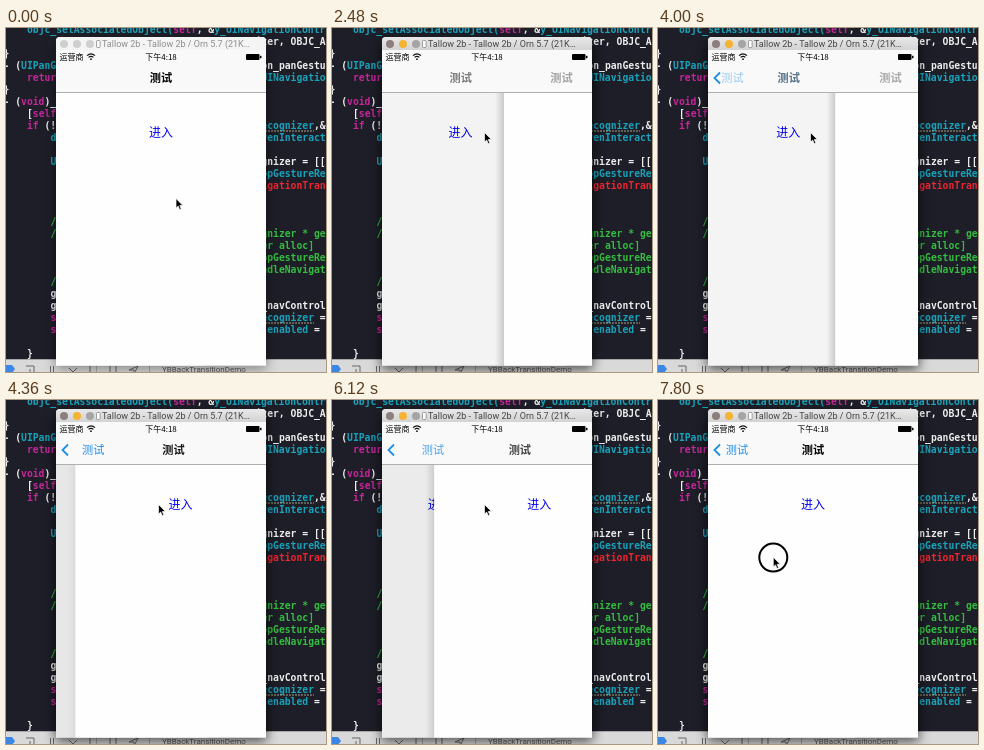
Recreate the animation shown at these times as an HTML page. Size 320 by 344 pixels, loop 8 s.

```html
<!DOCTYPE html>
<html lang="zh">
<head>
<meta charset="utf-8">
<title>Push transition</title>
<style>
html, body { margin: 0; width: 100%; height: 100%; overflow: hidden; background: #1d1e27; }
svg { display: block; width: 320px; height: 344px; }
text { white-space: pre; }
.code { font: bold 9.73px "DejaVu Sans Mono", monospace; }
.ui { font-family: "Noto Sans CJK SC", "Noto Sans CJK", sans-serif; text-anchor: middle; }
.bar { font-family: Roboto, sans-serif; }
</style>
</head>
<body>
<svg id="stage" viewBox="0 0 320 344" xmlns="http://www.w3.org/2000/svg">
  <defs>
    <linearGradient id="edge"><stop offset="0" stop-opacity="0"/><stop offset="1" stop-opacity=".17"/></linearGradient>
    <linearGradient id="chrome" x2="0" y2="1"><stop offset="0" stop-color="#e8e8e8"/><stop offset="1" stop-color="#d2d2d2"/></linearGradient>
    <filter id="blur" x="-20%" y="-20%" width="140%" height="140%"><feGaussianBlur stdDeviation="6"/></filter>
    <clipPath id="view"><rect x="50" y="22" width="210" height="315.5"/></clipPath>
  </defs>
  <rect width="320" height="344" fill="#1d1e27"/>
  <g id="code" class="code"></g>

  <g id="debugBar">
    <rect y="331.5" width="320" height="13" fill="#d9d9d9"/>
    <path d="M0 331.5H320" stroke="#a8a8a8"/>
    <path d="M0 337H6L9 341L6 345H0Z" fill="#3c87e6"/>
    <g fill="none" stroke="#666">
      <path d="M20 338H28V344M24 341V345M44.500 338V345M47.500 338V345M63 340L67 344L71 340M84 338V345M104 338V345M110 338V345"/>
      <path d="M90.500 334V344M143.500 334V344" stroke="#aaa"/>
      <path d="M123 342L132 338L128 346V342Z"/>
    </g>
    <text class="bar" x="156" y="344" font-size="8" fill="#555">YBBackTransitionDemo</text>
  </g>

  <rect id="shadow" x="49" y="14" width="212" height="328" rx="4" filter="url(#blur)"/>
  <path d="M50 337.500V13Q50 9 54 9H256Q260 9 260 13V337.500Z" fill="#fefefe"/>
  <path id="chromeBar" d="M50 22.500V13Q50 9 54 9H256Q260 9 260 13V22.500Z"/>
  <g id="dots"></g>
  <rect x="90.500" y="12.500" width="3.600" height="7" rx=".8" fill="#fff" stroke="#888" stroke-width=".8"/>
  <text id="caption" class="bar" x="96" y="19.300" font-size="9">Tallow 2b - Tallow 2b / Orn 5.7 (21K…</text>

  <g clip-path="url(#view)">
    <g id="under">
      <rect x="50" y="64" width="210" height="274" fill="#fefefe"/>
      <text class="ui" x="155" y="109" font-size="12" fill="#0000f0">进入</text>
      <rect id="dim" x="50" y="64" width="290" height="274"/>
    </g>
    <g id="over">
      <rect id="edgeShade" x="41" y="64" width="9" height="274" fill="url(#edge)"/>
      <rect x="50" y="64" width="210" height="274" fill="#fefefe"/>
      <text class="ui" x="155" y="109" font-size="12" fill="#0000f0">进入</text>
    </g>
    <rect x="50" y="22" width="210" height="42.500" fill="#f9f9f9"/>
    <path d="M50 64.500H260" stroke="#b0b0b0"/>
    <g class="ui" font-size="8">
      <text x="65.500" y="32">运营商</text>
      <text x="155" y="32" font-weight="500">下午4:18</text>
    </g>
    <g fill="none" stroke="#111" stroke-width="1.200">
      <path d="M81 27.600Q85 24.200 89 27.600M82.600 29.400Q85 27.400 87.400 29.400"/>
      <path d="M84.200 31L85 30.600L85.800 31L85 32Z" fill="#111" stroke-width=".6"/>
    </g>
    <rect x="240" y="26" width="13.500" height="6" rx="1" fill="#000"/>
    <rect x="254" y="27.800" width="1.500" height="2.400" fill="#000"/>
    <path id="chevron" d="M62 44.500L56.500 50L62 55.500" fill="none" stroke="#1f8ee8" stroke-width="1.800"/>
    <g id="titles" class="ui" font-size="11.200"></g>
  </g>
  <circle id="ring" r="14" fill="none" stroke="#000" stroke-width="2"/>
  <path id="cursor" d="M0 0V9.600L2.200 7.600L3.700 11.200L5.300 10.500L3.800 7H6.900Z" stroke="#fff" stroke-width=".7"/>
</svg>
<script>
const $ = id => document.getElementById(id);
const LOOP = 8000, TICK = 40;
const WIDTH = 210, PARALLAX = 63;

function add(parent, tag, attrs, text = '') {
  const el = document.createElementNS('http://www.w3.org/2000/svg', tag);
  for (const key in attrs) el.setAttribute(key, attrs[key]);
  el.textContent = text;
  parent.append(el);
  return el;
}
const set = (el, attrs) => { for (const key in attrs) el.setAttribute(key, attrs[key]); };
const clamp = v => Math.min(1, Math.max(0, v));

// Code behind the window: row, column, then colour letter and text pairs
const INK = { w: '#ececec', k: '#c5279a', t: '#19a3bb', g: '#35bd41', r: '#ee2530' };
const CODE = [
  [0, 4, 't', 'objc_setAssociatedObject(', 'k', 'self', 'w', ', &', 't', 'y_UINavigationContr'],
  [1, 43, 'w', 'izer, OBJC_A'],
  [2, 0, 'w', '}'],
  [3, 0, 'w', '- (', 't', 'UIPanGesture'], [3, 44, 'w', 'on_panGestu'],
  [4, 4, 'k', 'return'], [4, 43, 't', '_UINavigatio'],
  [5, 0, 'w', '}'],
  [6, 0, 'w', '- (', 'k', 'void', 'w', ')_'],
  [7, 4, 'w', '[', 'k', 'self'],
  [8, 4, 'k', 'if', 'w', ' (!'], [8, 44, 't', 'ecognizer', 'w', ',&'],
  [9, 8, 't', 'd'], [9, 44, 't', 'venInteract'],
  [11, 8, 't', 'U'], [11, 44, 'w', 'gnizer = [['],
  [12, 44, 't', 'opGestureRe'],
  [13, 44, 'r', 'igationTran'],
  [16, 8, 'g', '//'],
  [17, 8, 'g', '//'], [17, 44, 'g', 'gnizer * ge'],
  [18, 44, 'g', 'er alloc]'],
  [19, 44, 'g', 'opGestureRe'],
  [20, 44, 'g', 'ndleNavigat'],
  [21, 8, 'g', '//'],
  [22, 8, 'w', 'g'],
  [23, 8, 'w', 'g'], [23, 44, 'w', '_navControl'],
  [24, 8, 'k', 's'], [24, 44, 't', 'ecognizer', 'w', ' ='],
  [25, 8, 'k', 's'], [25, 44, 'w', '.', 't', 'enabled', 'w', ' ='],
  [27, 4, 'w', '}']
];
for (const [row, col, ...parts] of CODE) {
  const line = add($('code'), 'text', { x: -2.5 + col * 5.86, y: row * 12 + 4.8 });
  for (let i = 0; i < parts.length; i += 2) add(line, 'tspan', { fill: INK[parts[i]] }, parts[i + 1]);
}
for (const row of [8, 24]) {
  add($('code'), 'path', { d: `M256 ${row * 12 + 7}H308`, stroke: '#a5a58a', 'stroke-dasharray': '2 1' });
}

const dots = [58, 71, 84].map(x => add($('dots'), 'circle', { cx: x, cy: 16, r: 4 }));
const title = (fill, weight) => add($('titles'), 'text', { y: 54, fill, 'font-weight': weight }, '测试');
const oldTitle = title('#000', 700), newTitle = title('#000', 700);
const label = title('#1f8ee8', 400), oldLabel = title('#1f8ee8', 400);

const ACTIVE_AT = 2120;
const PUSHES = [2284, 3814, 5750];
const PRESSES = [[2120, 2240], [3600, 3760], [5520, 5680], [7800, 8000]];
const PATH = [
  [0, 170, 170.5], [1000, 170, 170.5], [1640, 154, 106.5], [1840, 154, 106.5],
  [1920, 152.5, 104.5], [6640, 152.5, 104.5], [7240, 115.3, 157.3], [LOOP, 115.3, 157.3]
];

// Remaining distance of a critically damped spring
function spring(ms) {
  const x = Math.max(0, ms) * 0.0073;
  return (1 + x) * Math.exp(-x);
}

function pointer(t) {
  const i = PATH.findIndex(p => p[0] > t);
  const [t0, x0, y0] = PATH[i - 1], [t1, x1, y1] = PATH[i];
  const u = (t - t0) / (t1 - t0), e = u * u * (3 - 2 * u);
  return [x0 + (x1 - x0) * e, y0 + (y1 - y0) * e];
}

function drawWindow(active) {
  set($('chromeBar'), { fill: active ? 'url(#chrome)' : '#f4f4f4' });
  set($('caption'), { fill: active ? '#444' : '#8c8c8c' });
  set($('shadow'), { opacity: active ? 0.6 : 0.35 });
  const fills = active ? ['#8c7f7e', '#f4b432', '#a4a4a4'] : ['#cfcfcf', '#cfcfcf', '#cfcfcf'];
  dots.forEach((dot, i) => set(dot, { fill: fills[i] }));
}

function drawPages(r) {
  set($('under'), { transform: `translate(${-PARALLAX * (1 - r)} 0)` });
  set($('over'), { transform: `translate(${WIDTH * r} 0)` });
  set($('dim'), { opacity: 0.1 * (1 - r) });
  set($('edgeShade'), { opacity: clamp(r * 3) });
}

function drawTitles(push, r) {
  const started = push >= 0, nested = push > 0;
  const fadeOut = clamp((r - 0.3) / 0.7);
  const fadeIn = nested ? clamp((1 - r) * 1.15) : clamp(1 - 2 * r);
  const backX = 79 + 76 * r;
  set(newTitle, { x: 155 + 114 * r, opacity: 1 - r });
  set(oldTitle, { x: backX, opacity: started ? fadeOut : 0 });
  set(label, { x: backX, opacity: started ? fadeIn : 0 });
  set(oldLabel, { x: 79 - 14 * (1 - r), opacity: nested ? fadeOut * 0.8 : 0 });
  set($('chevron'), { opacity: nested ? 1 : started ? fadeIn : 0 });
}

function draw(t) {
  const push = PUSHES.filter(start => start <= t).length - 1;
  const since = push < 0 ? Infinity : t - PUSHES[push];
  const rest = lag => push < 0 ? 0 : spring(since - lag);
  drawWindow(t >= ACTIVE_AT);
  drawPages(rest(0));
  drawTitles(push, rest(28));
  const [x, y] = pointer(t);
  set($('cursor'), { transform: `translate(${x} ${y})` });
  const pressed = PRESSES.some(([from, to]) => t >= from && t < to);
  set($('ring'), { cx: x, cy: y + 0.3, opacity: pressed ? 1 : 0 });
}

const begin = performance.now();
function frame() {
  const t = (performance.now() - begin) % LOOP;
  draw(Math.floor(t / TICK) * TICK);
  requestAnimationFrame(frame);
}
frame();
</script>
</body>
</html>
```
